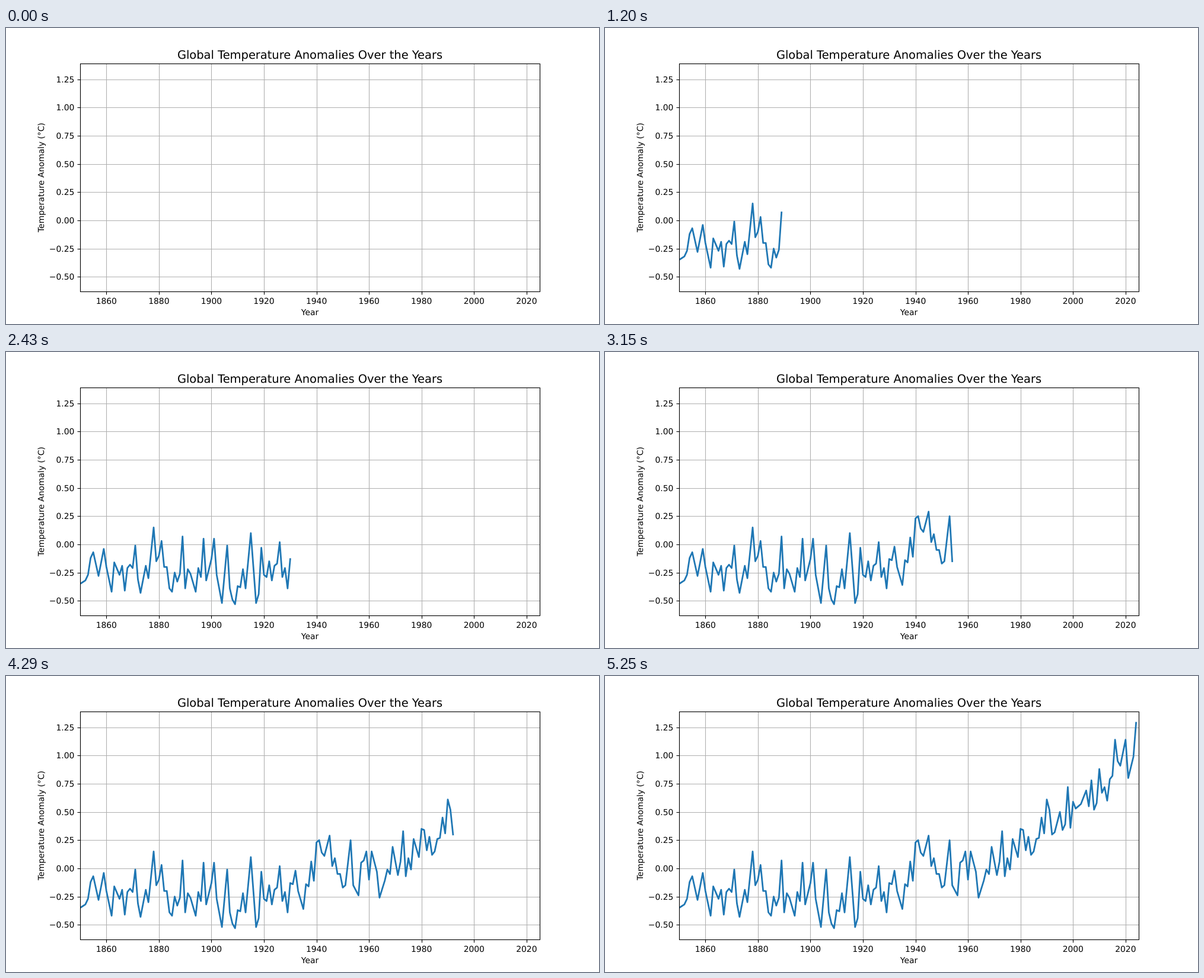
An HTML page that plays this animation: 1000x500 px, repeating every 5.28 s.

```html
<!DOCTYPE html>
<html lang="en">
<head>
<meta charset="utf-8">
<title>Global Temperature Anomalies</title>
<style>
  html, body { margin: 0; width: 100%; height: 100%; overflow: hidden; background: #fff; }
  svg { display: block; width: 100%; height: 100%; }
  text { font: 13.889px "DejaVu Sans", sans-serif; text-anchor: middle; text-rendering: geometricPrecision; }
  .title { font-size: 19.444px; }
  .value { text-anchor: end; }
  path, rect { fill: none; stroke-width: 1.111; }
  .grid { stroke: #b0b0b0; }
  .axis { stroke: #000; }
  #series { stroke: #1f77b4; stroke-width: 2.778; stroke-linejoin: round; stroke-linecap: square; }
</style>
</head>
<body>
<svg viewBox="0 0 1000 500">
  <clipPath id="plot"><rect x="125" y="60" width="775" height="385"/></clipPath>
  <g id="grid"></g>
  <g clip-path="url(#plot)"><path id="series"/></g>
  <rect class="axis" x="125.5" y="60.5" width="775" height="385"/>
  <text class="title" x="512.5" y="52">Global Temperature Anomalies Over the Years</text>
  <text x="512.5" y="485">Year</text>
  <text transform="translate(64 252.5) rotate(-90)">Temperature Anomaly (°C)</text>
</svg>
<script>
const FIRST_YEAR = 1850, STEP_MS = 30, LOOP_MS = 5280;

// Hundredths of a degree, one decade per row; gaps lie midway between their neighbours.
const anomalies = [
  -35,,-32,-27,-12,-7,,-28,,-4,
  -20,,-42,-16,,-27,-19,-41,-21,-18,
  -21,-1,-31,-43,,-19,-30,,15,-15,
  -10,3,-20,-20,-39,-42,-25,-33,-26,7,
  -39,-22,-26,,-42,-21,-29,5,-32,,
  -13,5,-27,,-52,,-1,-39,-49,-53,
  -37,-38,-22,-39,,10,,-52,-44,-3,
  -27,-29,-15,-32,-19,-17,2,-29,-21,-39,
  -13,-14,-2,-20,,-36,-14,-16,6,-11,
  23,25,14,11,,29,2,9,-5,-5,
  -17,-15,,25,-15,,-24,5,7,15,
  -10,15,,-3,-26,,-11,-1,-5,19,
  ,-6,6,33,-7,9,-1,26,,10,
  35,34,16,28,12,15,26,27,45,31,
  61,52,30,32,,50,34,39,72,36,
  59,53,,57,,69,55,78,52,58,
  88,67,72,60,79,82,114,95,91,,
  114,80,,99,129
];

const xOf = year => 125 + (year - FIRST_YEAR) * 775 / 175;
const yOf = degrees => 445 - (degrees + 0.63) * 385 / 2.02;
const snap = v => Math.round(v) + 0.5;

let marks = "";
for (let year = 1860; year <= 2020; year += 20) {
  const x = snap(xOf(year));
  marks += `<path class="grid" d="M${x} 60V445"/><path class="axis" d="M${x} 445.5v5"/>
    <text x="${xOf(year)}" y="466">${year}</text>`;
}
for (let degrees = -0.5; degrees <= 1.25; degrees += 0.25) {
  const y = snap(yOf(degrees));
  const label = degrees.toFixed(2).replace("-", "\u2212");
  marks += `<path class="grid" d="M125 ${y}H900"/><path class="axis" d="M125.5 ${y}h-5"/>
    <text class="value" x="115.3" y="${y + 4.5}">${label}</text>`;
}
document.getElementById("grid").innerHTML = marks;

const points = Array.from(anomalies, (value, i) => {
  const hundredths = value ?? (anomalies[i - 1] + anomalies[i + 1]) / 2;
  return `${xOf(FIRST_YEAR + i).toFixed(2)} ${yOf(hundredths / 100).toFixed(2)}`;
});

const series = document.getElementById("series");
function draw() {
  const count = Math.floor(performance.now() % LOOP_MS / STEP_MS);
  series.setAttribute("d", count > 1 ? "M" + points.slice(0, count).join("L") : "");
  requestAnimationFrame(draw);
}
draw();
</script>
</body>
</html>
```
